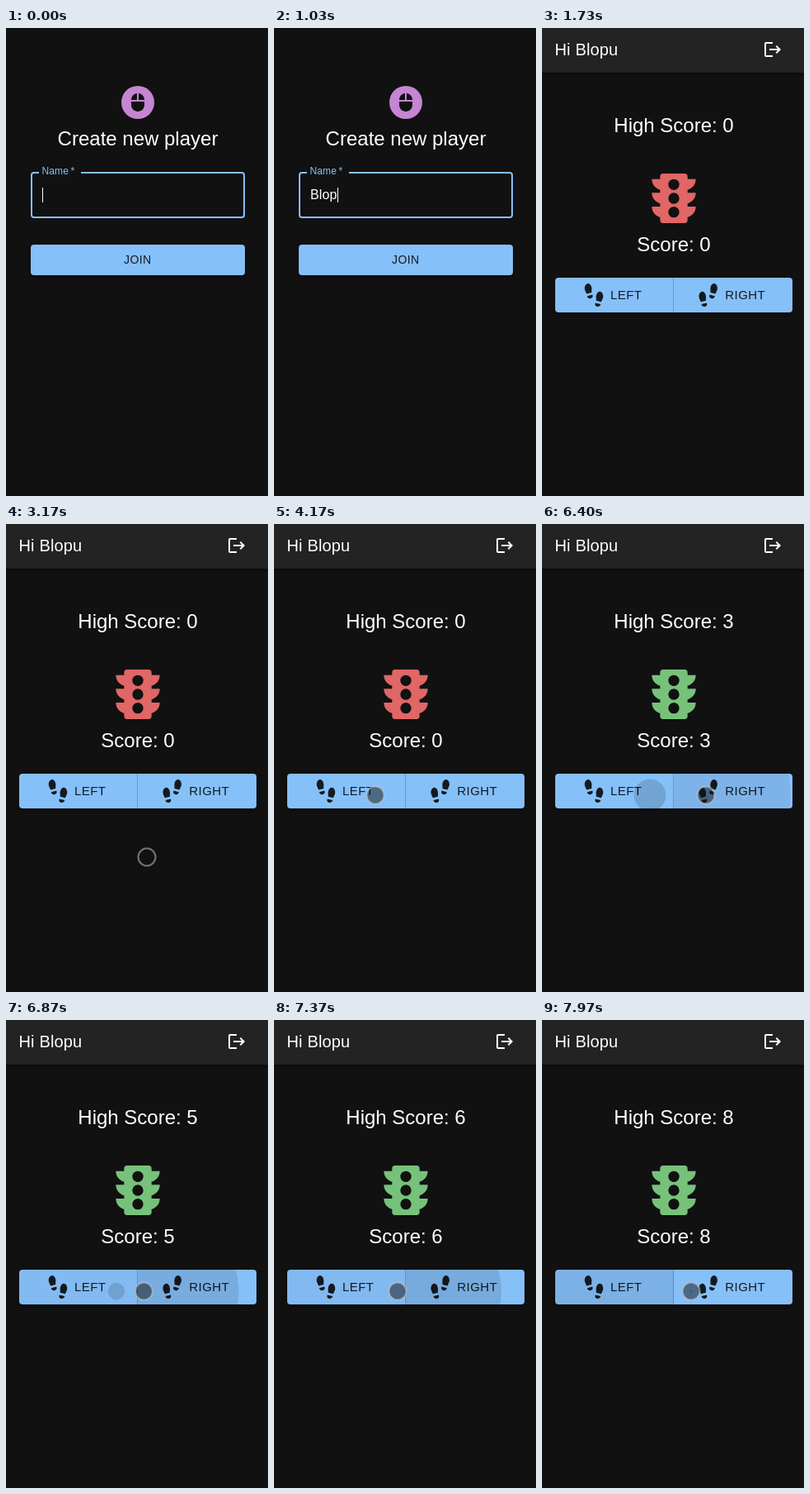
An HTML page for the animation above (8000 ms loop, 318x566 px).

```html
<!DOCTYPE html>
<html lang="en">
<head>
<meta charset="utf-8">
<title>Red light, green light</title>
<style>
  html, body { margin: 0; width: 100%; height: 100%; overflow: hidden; background: #111; }
  svg { display: block; width: 100vw; height: 100vh; font-family: "Liberation Sans", Arial, sans-serif; }
  text { fill: #fff; white-space: pre; }
  .title { font-size: 24px; text-anchor: middle; }
  .button { font-size: 15px; letter-spacing: .43px; fill: #141a20; }
  .blue { fill: #86c0f9; }
  .icon { fill: #141a20; }
  .raised { filter: drop-shadow(0 2px 2px rgba(0, 0, 0, .4)); }
</style>
</head>
<body>
<svg viewBox="0 0 318 566">
  <defs>
    <clipPath id="leftClip"><path d="M160 302H20a4 4 0 0 0-4 4v34a4 4 0 0 0 4 4H160z"/></clipPath>
    <clipPath id="rightClip"><path d="M160 302H300a4 4 0 0 1 4 4v34a4 4 0 0 1-4 4H160z"/></clipPath>
    <path id="feet" d="M10.74 11.72C11.21 12.95 11.16 14.23 9.75 14.74C6.85 15.81 6.2 13 6.16 12.86zM5.71 10.91L10.03 9.84C9.84 8.79 10.13 7.74 10.13 6.5C10.13 4.82 8.8 1.53 6.68 2.06C4.26 2.66 3.91 5.35 4 6.65C4.12 7.95 5.64 10.73 5.71 10.91M17.85 19.85C17.82 20 17.16 22.8 14.26 21.74C12.86 21.22 12.8 19.94 13.27 18.71zM20 13.65C20.1 12.35 19.76 9.65 17.33 9.05C15.22 8.5 13.88 11.84 13.88 13.5C13.88 14.73 14.17 15.78 13.97 16.83L18.3 17.9C18.38 17.72 19.89 14.94 20 13.65z"/>
  </defs>
  <rect width="318" height="566" fill="#111"/>

  <g id="form">
    <circle cx="160" cy="90" r="20" fill="#c585d2"/>
    <path transform="translate(148 78)" fill="#111" d="M13 1.07V9h7c0-4.08-3.05-7.44-7-7.93zM4 15c0 4.42 3.58 8 8 8s8-3.58 8-8v-4H4v4zm7-13.93C7.05 1.56 4 4.92 4 9h7V1.07z"/>
    <text class="title" x="160" y="142">Create new player</text>
    <path fill="none" stroke="#86c0f9" stroke-width="2" d="M40 175H34a3 3 0 0 0-3 3V226a3 3 0 0 0 3 3H286a3 3 0 0 0 3-3V178a3 3 0 0 0-3-3H91"/>
    <text class="blue" x="43.5" y="177" font-size="12" letter-spacing=".11">Name&#8201;*</text>
    <text id="typed" x="44" y="207" font-size="16" letter-spacing=".15"></text>
    <rect id="caret" y="193" width="1" height="18" fill="#fff"/>
    <rect class="blue raised" x="30" y="262" width="260" height="37" rx="4"/>
    <text class="button" x="143" y="285" style="font-size:14px;letter-spacing:.4px">JOIN</text>
  </g>

  <g id="game">
    <rect class="raised" width="318" height="54" fill="#232323"/>
    <text id="greeting" x="15.5" y="32.5" font-size="20" letter-spacing=".15"></text>
    <path transform="translate(268 14)" fill="#fff" d="m17 7-1.41 1.41L18.17 11H8v2h10.17l-2.58 2.58L17 17l5-5zM4 5h8V3H4c-1.1 0-2 .9-2 2v14c0 1.1.9 2 2 2h8v-2H4V5z"/>
    <text id="highScore" class="title" x="160" y="126"></text>
    <path id="light" transform="translate(120 166) scale(3.3333)" d="M20 10h-3V8.86c1.72-.45 3-2 3-3.86h-3V4c0-.55-.45-1-1-1H8c-.55 0-1 .45-1 1v1H4c0 1.86 1.28 3.41 3 3.86V10H4c0 1.86 1.28 3.41 3 3.86V15H4c0 1.86 1.28 3.41 3 3.86V20c0 .55.45 1 1 1h8c.55 0 1-.45 1-1v-1.14c1.72-.45 3-2 3-3.86h-3v-1.14c1.72-.45 3-2 3-3.86zm-8 9a2 2 0 1 1 0-4a2 2 0 0 1 0 4zm0-5a2 2 0 1 1 0-4a2 2 0 0 1 0 4zm0-5a2 2 0 1 1 0-4a2 2 0 0 1 0 4z"/>
    <text id="score" class="title" x="160" y="270"></text>
    <rect class="blue raised" x="16" y="302" width="288" height="42" rx="4"/>
    <rect x="159" y="302" width="1" height="42" fill="#46a0ee"/>
    <use class="icon" href="#feet" transform="translate(63 323) scale(1.4) translate(-12 -12)"/>
    <use class="icon" href="#feet" transform="translate(201.7 323) scale(-1.4 1.4) translate(-12 -12)"/>
    <text class="button" x="83" y="328">LEFT</text>
    <text class="button" x="222.3" y="328">RIGHT</text>
    <g id="ripples"></g>
    <circle id="pointer" r="10.5" fill="rgba(17,17,17,.5)" stroke="rgba(200,200,200,.55)" stroke-width="2"/>
  </g>
</svg>
<script>
  const LOOP = 8000, JOIN = 1700, GREEN = 4700, ENTER = 2560;
  const NAME = "Blopu";
  const KEYS = [350, 550, 750, 950, 1100];
  // Taps on the step buttons: time, x
  const TAPS = [[5570, 123], [5930, 195], [6270, 131], [6500, 199],
                [6780, 134], [7020, 194], [7450, 150], [7930, 181]];
  const TAP_Y = 328;
  // Pointer path: time, x, y
  const PATH = [[ENTER, 190, 538], [3170, 171, 403], [3370, 165, 377], [3850, 123, TAP_Y]];
  for (const [time, x] of TAPS) PATH.push([time - 105, x, TAP_Y], [time + 40, x, TAP_Y]);

  const $ = id => document.getElementById(id);
  const clamp = v => Math.min(1, Math.max(0, v));
  const smooth = v => v * v * (3 - 2 * v);
  const ease = v => smooth(clamp(v) ** .9);
  const show = (node, on) => node.style.display = on ? "" : "none";
  const setText = (id, value) => { if ($(id).textContent !== value) $(id).textContent = value; };

  const ripples = TAPS.map(([time, x]) => {
    const left = x < 160;
    const group = document.createElementNS("http://www.w3.org/2000/svg", "g");
    group.setAttribute("clip-path", `url(#${left ? "leftClip" : "rightClip"})`);
    group.innerHTML = `<circle cx="${x}" cy="${TAP_Y}"/>`;
    $("ripples").append(group);
    const reach = left ? x - 16 : 304 - x;
    return { node: group.firstChild, start: time + 10, size: Math.hypot(reach + 1, 27),
             strength: left ? .3 : .18 };
  });

  function drawForm(t) {
    const count = KEYS.filter(k => k <= t).length;
    setText("typed", NAME.slice(0, count));
    const width = count ? $("typed").getComputedTextLength() : 0;
    const idle = t - (count ? KEYS[count - 1] : 0);
    $("caret").setAttribute("x", Math.round(44 + width));
    show($("caret"), idle % 1000 < 500);
  }

  function drawRipples(t) {
    for (const { node, start, size, strength } of ripples) {
      const age = t - start;
      show(node, age > 0 && age < 750);
      const grow = ease(age / 550);
      node.setAttribute("r", size * grow);
      node.setAttribute("opacity", (.12 + (strength - .12) * grow) * (1 - ease((age - 160) / 550)));
    }
  }

  function drawPointer(t) {
    show($("pointer"), t >= ENTER);
    const next = PATH.findIndex(p => p[0] > t);
    const b = next < 0 ? PATH[PATH.length - 1] : PATH[next];
    const a = next < 0 ? b : PATH[Math.max(0, next - 1)];
    let f = a === b ? 0 : (t - a[0]) / (b[0] - a[0]);
    if (a[2] === TAP_Y) f = smooth(f);
    $("pointer").setAttribute("cx", a[1] + (b[1] - a[1]) * f);
    $("pointer").setAttribute("cy", a[2] + (b[2] - a[2]) * f);
  }

  function draw(t) {
    const playing = t >= JOIN;
    show($("form"), !playing);
    show($("game"), playing);
    if (!playing) return drawForm(t);
    const score = TAPS.filter(tap => tap[0] <= t).length;
    setText("highScore", "High Score: " + score);
    setText("score", "Score: " + score);
    $("light").setAttribute("fill", t < GREEN ? "#e16666" : "#77c27b");
    drawRipples(t);
    drawPointer(t);
  }

  setText("greeting", "Hi " + NAME);
  const begin = performance.now();
  function tick() {
    draw((performance.now() - begin) % LOOP);
    requestAnimationFrame(tick);
  }
  tick();
</script>
</body>
</html>
```
